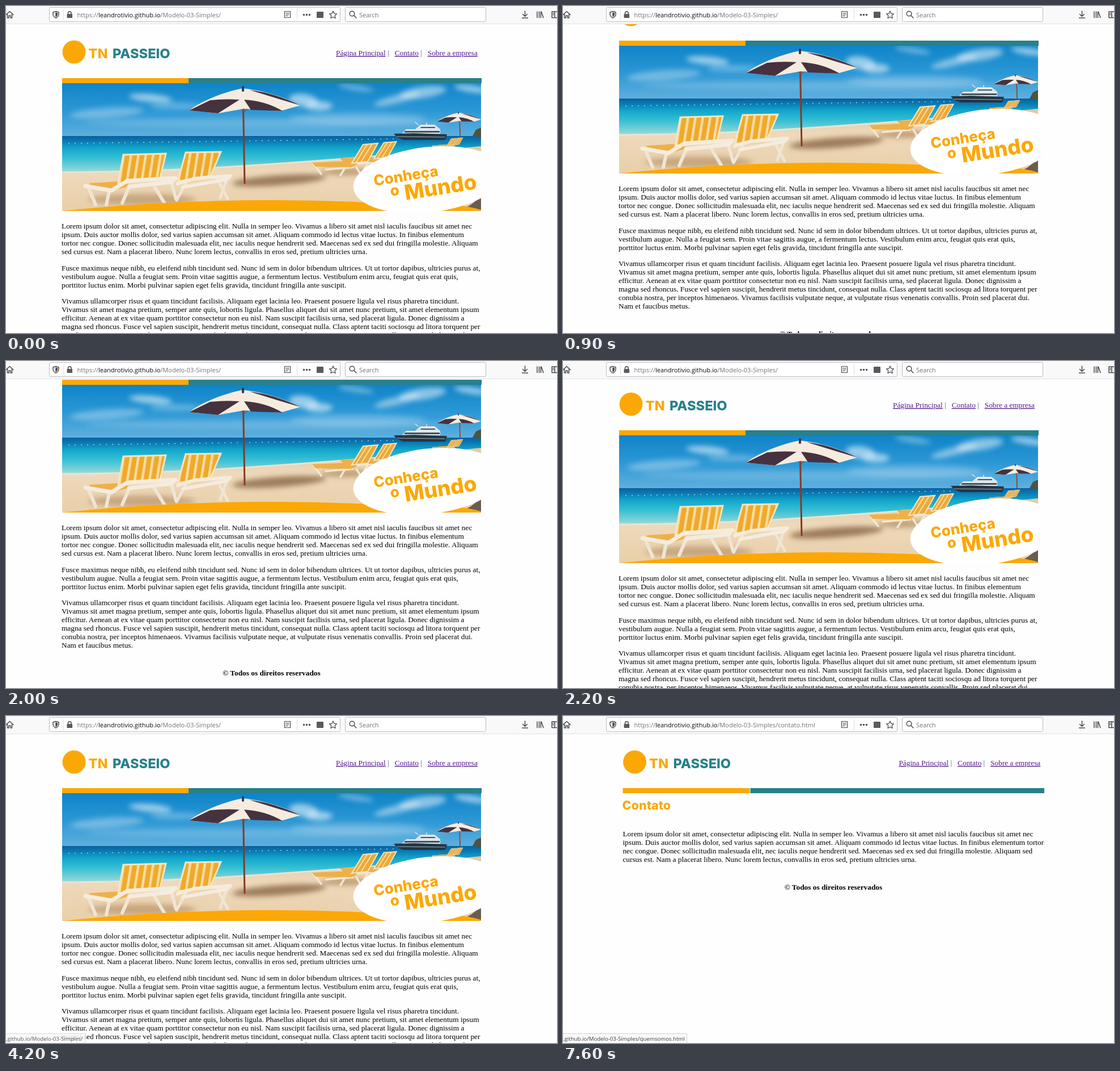
An HTML page that plays this animation: 972 by 576 pixels, repeating every 8000 ms.

```html
<!DOCTYPE html>
<html lang="pt">
<head>
<meta charset="utf-8">
<title>Agência</title>
<style>
  html, body { margin: 0; width: 100%; height: 100%; overflow: hidden; background: #fff; }
  svg { display: block; width: 972px; height: 576px; }
  .body { font: 13.33px "Liberation Serif", "Times New Roman", serif; fill: #000; }
  .bold { font-weight: 700; text-anchor: middle; }
  .link { fill: #551a8b; text-decoration: underline 1px; text-underline-offset: 2px; text-decoration-skip-ink: none; }
  .ui { font: 11px "Open Sans", "Noto Sans", sans-serif; fill: #737375; }
  .status { font-size: 9.65px; fill: #3c3c3e; }
  .brand { font: 800 23.6px Inter, Roboto, sans-serif; }
  .icon { fill: none; stroke: #4a4a4f; stroke-width: 1.5; stroke-linecap: round; stroke-linejoin: round; }
</style>
</head>
<body>
<svg id="stage" viewBox="0 0 972 576" xmlns="http://www.w3.org/2000/svg"></svg>
<script>
const ORANGE = '#fba806', TEAL = '#28808b';

const text = (x, y, s, cls = 'body', more = '') =>
  `<text x="${x}" y="${y}" class="${cls}" ${more}>${s}</text>`;
const rect = (x, y, w, h, fill, more = '') =>
  `<rect x="${x}" y="${y}" width="${w}" height="${h}" fill="${fill}" ${more}/>`;
const path = (d, fill, more = '') => `<path d="${d}" fill="${fill}" ${more}/>`;
const line = (d, color, width) =>
  path(d, 'none', `stroke="${color}" stroke-width="${width}" stroke-linecap="round" stroke-linejoin="round"`);
const lines = (x, y, list) => list.map((s, i) => text(x, y + i * 15, s)).join('');

const homeText = [
  [392, [
    'Lorem ipsum dolor sit amet, consectetur adipiscing elit. Nulla in semper leo. Vivamus a libero sit amet nisl iaculis faucibus sit amet nec',
    'ipsum. Duis auctor mollis dolor, sed varius sapien accumsan sit amet. Aliquam commodo id lectus vitae luctus. In finibus elementum',
    'tortor nec congue. Donec sollicitudin malesuada elit, nec iaculis neque hendrerit sed. Maecenas sed ex sed dui fringilla molestie. Aliquam',
    'sed cursus est. Nam a placerat libero. Nunc lorem lectus, convallis in eros sed, pretium ultricies urna.']],
  [466, [
    'Fusce maximus neque nibh, eu eleifend nibh tincidunt sed. Nunc id sem in dolor bibendum ultrices. Ut ut tortor dapibus, ultricies purus at,',
    'vestibulum augue. Nulla a feugiat sem. Proin vitae sagittis augue, a fermentum lectus. Vestibulum enim arcu, feugiat quis erat quis,',
    'porttitor luctus enim. Morbi pulvinar sapien eget felis gravida, tincidunt fringilla ante suscipit.']],
  [524, [
    'Vivamus ullamcorper risus et quam tincidunt facilisis. Aliquam eget lacinia leo. Praesent posuere ligula vel risus pharetra tincidunt.',
    'Vivamus sit amet magna pretium, semper ante quis, lobortis ligula. Phasellus aliquet dui sit amet nunc pretium, sit amet elementum ipsum',
    'efficitur. Aenean at ex vitae quam porttitor consectetur non eu nisl. Nam suscipit facilisis urna, sed placerat ligula. Donec dignissim a',
    'magna sed rhoncus. Fusce vel sapien suscipit, hendrerit metus tincidunt, consequat nulla. Class aptent taciti sociosqu ad litora torquent per',
    'conubia nostra, per inceptos himenaeos. Vivamus facilisis vulputate neque, at vulputate risus venenatis convallis. Proin sed placerat dui.',
    'Nam et faucibus metus.']]
];
const contactText = [
  'Lorem ipsum dolor sit amet, consectetur adipiscing elit. Nulla in semper leo. Vivamus a libero sit amet nisl iaculis faucibus sit amet nec',
  'ipsum. Duis auctor mollis dolor, sed varius sapien accumsan sit amet. Aliquam commodo id lectus vitae luctus. In finibus elementum tortor',
  'nec congue. Donec sollicitudin malesuada elit, nec iaculis neque hendrerit sed. Maecenas sed ex sed dui fringilla molestie. Aliquam sed',
  'cursus est. Nam a placerat libero. Nunc lorem lectus, convallis in eros sed, pretium ultricies urna.'];

// Page header: logo dx and menu dx differ between the two pages.
const header = (dx, menu, id) =>
  `<circle cx="${120 + dx}" cy="81" r="20.5" fill="${ORANGE}"/>` +
  text(145.5 + dx, 92, 'TN', 'brand', `fill="${ORANGE}"`) +
  text(188 + dx, 92, 'PASSEIO', 'brand', `fill="${TEAL}"`) +
  text(582 + menu, 87, 'Página Principal', 'body link', `id="${id}Home"`) +
  text(673 + menu, 87, '|', 'body', 'style="fill:#3f6268"') +
  text(685.7 + menu, 87, 'Contato', 'body link', `id="${id}Contact"`) +
  text(731 + menu, 87, '|', 'body', 'style="fill:#3f6268"') +
  text(743.8 + menu, 87, 'Sobre a empresa', 'body link');

const footer = (x, y) => text(x, y, '© Todos os direitos reservados', 'body bold');

const gradient = (id, stops) =>
  `<linearGradient id="${id}" x1="0" y1="0" x2="0" y2="1">` +
  stops.map(([o, c]) => `<stop offset="${o}" stop-color="${c}"/>`).join('') + '</linearGradient>';

const defs = `<defs>
  ${gradient('sky', [[0, '#0f84c8'], [.5, '#2b97d5'], [1, '#5fb0dd']])}
  ${gradient('sea', [[0, '#0b5f9c'], [.14, '#0a7cb4'], [.3, '#12a5cb'], [.55, '#35bfd4'], [.8, '#7bd2d8'], [1, '#b9e0da']])}
  ${gradient('sand', [[0, '#e2c8a2'], [.4, '#eed9bb'], [1, '#e9cfa9']])}
  <pattern id="stripes" width="13" height="10" patternUnits="userSpaceOnUse" patternTransform="skewX(-9)">
    <rect width="13" height="10" fill="#f0a92a"/><rect width="4.500" height="10" fill="#f7dca2"/>
  </pattern>
  <filter id="soft" x="-20%" y="-50%" width="140%" height="200%"><feGaussianBlur stdDeviation="5"/></filter>
  <clipPath id="photo"><rect x="99" y="136" width="739" height="225"/></clipPath>
  <clipPath id="view"><rect y="32" width="972" height="544"/></clipPath>
</defs>`;

const cloud = (x, y, rx, ry, o, tilt = 0) =>
  `<ellipse cx="${x}" cy="${y}" rx="${rx}" ry="${ry}" fill="#eaf3fa" opacity="${o}" transform="rotate(${tilt} ${x} ${y})"/>`;

// Far lounger, back on the right, foot on the left.
const lounger = (x, y, s) => `<g transform="translate(${x} ${y}) scale(${s})">` +
  line('M2 36L16 54M60 40L50 56M78 42L84 52M24 46L72 42', '#f3e7d2', 3.5) +
  path('M0 34L68 31L80 36L70 42L6 41Z', '#eeb04a') +
  path('M90 2L116 0L98 32L70 35Z', '#eda838', 'stroke="#f6e8cd" stroke-width="2"') +
  line('M97 2L77 34M106 1L86 33', '#f9dfa0', 2) + '</g>';

const parasol = (x, y, s) => `<g transform="translate(${x} ${y}) scale(${s})">` +
  path('M0 0C-28 5 -70 20 -95 39L-44 44L2 36L66 40L101 30C70 13 28 3 0 0Z', '#f5ecdf') +
  path('M-58 21L-95 39L-44 44L-6 20Q-32 18 -58 21ZM2 20L14 38L70 40Q40 22 2 20ZM12 3L64 19L101 30Q56 8 12 3Z', '#46323f') +
  line('M0 -2V4', '#46323f', 4) + '</g>';

const photo = `<g clip-path="url(#photo)">
  ${rect(99, 136, 739, 94, 'url(#sky)')}
  <g filter="url(#soft)">
    ${cloud(255, 162, 38, 7, .6, 5)}${cloud(178, 188, 65, 9, .35, -4)}${cloud(300, 176, 46, 6, .3)}
    ${cloud(525, 166, 26, 11, .6, 8)}${cloud(552, 176, 24, 8, .6)}
    ${cloud(735, 152, 42, 10, .55, -8)}${cloud(690, 164, 42, 7, .5, -14)}
    ${cloud(617, 144, 32, 5, .4, 8)}${cloud(822, 146, 32, 6, .6, 8)}
    ${cloud(460, 206, 320, 8, .2)}${cloud(620, 198, 120, 10, .25)}
  </g>
  ${rect(99, 229, 739, 70, 'url(#sea)')}
  ${path('M99 293Q260 292 400 283T660 264L838 247V361H99Z', 'url(#sand)')}
  ${line('M99 293Q260 292 400 283T660 264', '#e6e3d2', 3)}
  <path d="M110 242Q400 238 690 234" fill="none" stroke="#b9dfe8" stroke-width="1.300" stroke-dasharray="2 9"/>
  ${path('M823 229L829 218L838 214V231Z', '#4d5440')}
  ${path('M698 225L706 217H722L731 209H756L766 217V225Z', '#dfe7ea')}
  ${path('M704 220H765V223H702ZM732 213H757V215H731Z', '#44545d')}
  ${path('M684 225L720 224L778 226L775 236H702Q690 233 684 225Z', '#243544')}
  ${line('M690 230L774 231', '#9fb4bf', 1)}
  ${line('M727 209L722 205M742 209V206', '#dfe8ec', 1.5)}
  <g filter="url(#soft)">
    <ellipse cx="482" cy="307" rx="83" ry="9" fill="#8f6d4a" opacity=".85" transform="rotate(-4 482 307)"/>
    <ellipse cx="240" cy="341" rx="95" ry="10" fill="#b08b61" opacity=".6"/>
    <ellipse cx="600" cy="292" rx="45" ry="6" fill="#a78055" opacity=".7"/>
  </g>
  ${line('M800 194L801 228', '#87513a', 2)}${parasol(798, 188, .4)}
  ${line('M418 150L421 312', '#863a25', 3)}
  ${line('M421 186L391 166M419 186L450 168', '#8d4a31', 1.3)}
  ${parasol(418, 145, 1)}
  ${lounger(763, 232, .37)}${lounger(752, 233, .37)}${lounger(589, 239, .86)}${lounger(540, 242, 1)}
  ${line('M317 312L301 342M372 304L391 339M391 300L378 338', '#f0e5d3', 5)}
  ${path('M317 258L379 257L361 299L303 309Z', 'url(#stripes)', 'stroke="#f7e5bd" stroke-width="3"')}
  ${line('M303 313L332 304L396 299L390 305L312 319', '#f5ecdd', 6)}
  ${line('M145 319L158 350M183 322L177 350M218 317L205 347M291 308L300 340M262 318L280 348', '#f0e5d3', 6)}
  ${path('M148 312L200 309L222 316L186 326L146 319Z', '#eeb04a')}
  ${path('M207 262L282 260L271 306L198 312Z', 'url(#stripes)', 'stroke="#f7e5bd" stroke-width="3"')}
  ${line('M140 317L186 325L214 308L299 303L292 310L217 318', '#f5ecdd', 7)}
  ${path('M820 350L838 336V361H800Z', '#6b5d4e')}
  ${path('M99 361Q468 323 838 361Z', ORANGE)}
  ${path('M775 361L790 351Q815 352 838 359V361Z', ORANGE)}
  <ellipse cx="745" cy="306" rx="133" ry="57.500" fill="#fff" transform="rotate(-6.500 745 306)"/>
  ${text(0, 0, 'Conheça', 'brand', `fill="${ORANGE}" style="font-size:26px" transform="translate(650 317) rotate(-9)"`)}
  ${text(0, 0, 'o', 'brand', `fill="${ORANGE}" style="font-size:26px" transform="translate(679 335) rotate(-9)"`)}
  ${text(0, 0, 'Mundo', 'brand', `fill="${ORANGE}" style="font-size:37px" transform="translate(705 342) rotate(-9)"`)}
</g>`;

const home = `<g id="home">${header(0, 0, 'a')}
  ${rect(99, 127, 223, 9, ORANGE)}${rect(322, 127, 517, 9, TEAL)}${photo}
  ${homeText.map(([y, list]) => lines(98, y, list)).join('')}
  ${footer(468.5, 648)}</g>`;

const contact = `<g id="contact">${header(6.5, 10.4, 'b')}
  ${rect(105.5, 127, 224, 9, ORANGE)}${rect(330.5, 127, 518.5, 9, TEAL)}
  ${text(104.5, 165, 'Contato', 'brand', `fill="${ORANGE}" style="font-size:21.6px"`)}
  ${lines(105.4, 212, contactText)}
  ${footer(477, 306)}</g>`;

const icon = (d, more = '') => `<path class="icon" d="${d}" ${more}/>`;
const solid = 'style="fill:#4a4a4f"';
const toolbar = `<g>
  ${rect(0, 0, 972, 31, '#f9f9fa')}${rect(0, 31, 972, 1, '#dce3e8')}
  ${rect(76.5, 2.5, 513, 25, '#fff', 'rx="2" stroke="#bcbcbf"')}
  ${rect(598.5, 2.5, 248, 25, '#fff', 'rx="2" stroke="#bcbcbf"')}
  ${icon('M0 15.5L6.5 9.5L13 15.5M2.5 14.5V21H5V17H8V21H10.500V14.5')}
  ${icon('M88 9.500L93 11V15Q92.500 19 88 21Q83.500 19 83 15V11Z')}${icon('M88 12V18.5Q90.500 17 90.500 13Z', solid)}
  ${rect(101, 5, 1, 20, '#e3e3e5')}${rect(513, 6, 1, 18, '#dcdcde')}
  ${icon('M109.500 14V12.500A2.800 2.800 0 0 1 115.100 12.500V14')}${rect(107.5, 14, 9.6, 7, '#5a5a5e', 'rx="1"')}
  ${icon('M491.500 9.500H501.500V20.500H491.500ZM494 12.500H499M494 15H499M494 17.500H497', 'style="stroke-width:1.2"')}
  ${[525.5, 530.5, 535.5].map(x => `<circle cx="${x}" cy="15.500" r="1.700" fill="#4a4a4f"/>`).join('')}
  ${rect(548, 10, 12, 11, '#5a5a5e', 'rx="1"')}
  ${icon('M577 9L579 13.300L583.500 13.800L580.200 16.900L581 21.500L577 19.200L573 21.500L573.800 16.900L570.500 13.800L575 13.300Z', 'style="stroke-width:1.300"')}
  <circle class="icon" cx="610.500" cy="13.500" r="4.300"/>${icon('M613.800 16.800L618 21')}
  ${text(623, 20, 'Search', 'ui')}
  ${icon('M915.500 9V18M911.500 14.500L915.500 18.300L919.500 14.500M910.500 21H920.500')}
  ${icon('M937 10V20.500M940.500 10V20.500M943.500 10V20.500M944.500 10.500L948 20.500')}
  ${icon('M976 10H963V20.500H976M968 10V20.500M965 13H966M965 15.500H966')}
  <text x="125.500" y="20" class="ui">https://<tspan fill="#0c0c0d">leandrotivio.github.io</tspan><tspan id="url"></tspan></text>
</g>`;

const status = `<g id="status">
  <rect id="panel" x="-1" y="559.500" height="18" fill="#f9f9fa" stroke="#d2d2d5"/>
  ${text(0, 572, '', 'ui status', 'id="hint"')}</g>`;

const stage = document.getElementById('stage');
stage.innerHTML = defs + rect(0, 0, 972, 576, '#fefefe') +
  `<g clip-path="url(#view)">${home}${contact}</g>` + toolbar + status;
const el = id => document.getElementById(id);

const SITE = '/Modelo-03-Simples/';
const LOOP = 8000;
// Each track lists [start ms, value]; the value holds until the next start.
const scroll = [[0, 0], [700, 6], [800, 36], [900, 66], [1000, 92], [1100, 100],
  [2000, 94], [2100, 48], [2200, 5], [2300, 0]];
const opacity = [[0, 0], [3100, .5], [3200, 1], [3300, 0], [3500, 1], [4200, .85], [4300, .4], [4400, 0],
  [4600, .6], [4700, 1], [5700, .4], [5800, 0], [7600, 1]];
const hint = [[0, ['', 141]], [4600, ['contato.html', 199]], [7600, ['quemsomos.html', 219]]];
const pressed = [[0, ''], [3200, 'aHome'], [3300, ''], [4700, 'aContact'], [4900, '']];
const at = (track, t) => track.reduce((v, [start, next]) => t >= start ? next : v, track[0][1]);

function draw(t) {
  const onContact = t >= 5200;
  el('home').style.display = onContact ? 'none' : '';
  el('contact').style.display = onContact ? '' : 'none';
  el('home').setAttribute('transform', `translate(0 ${-at(scroll, t)})`);
  el('url').textContent = SITE + (t >= 5100 ? 'contato.html' : '');
  const [file, width] = at(hint, t);
  el('hint').textContent = '.github.io' + SITE + file;
  el('panel').setAttribute('width', width + .5);
  el('status').setAttribute('opacity', at(opacity, t));
  for (const id of ['aHome', 'aContact'])
    el(id).style.fill = at(pressed, t) === id ? '#ee0000' : '';
}

const begin = performance.now();
function tick() {
  draw((performance.now() - begin) % LOOP);
  requestAnimationFrame(tick);
}
tick();
</script>
</body>
</html>
```
